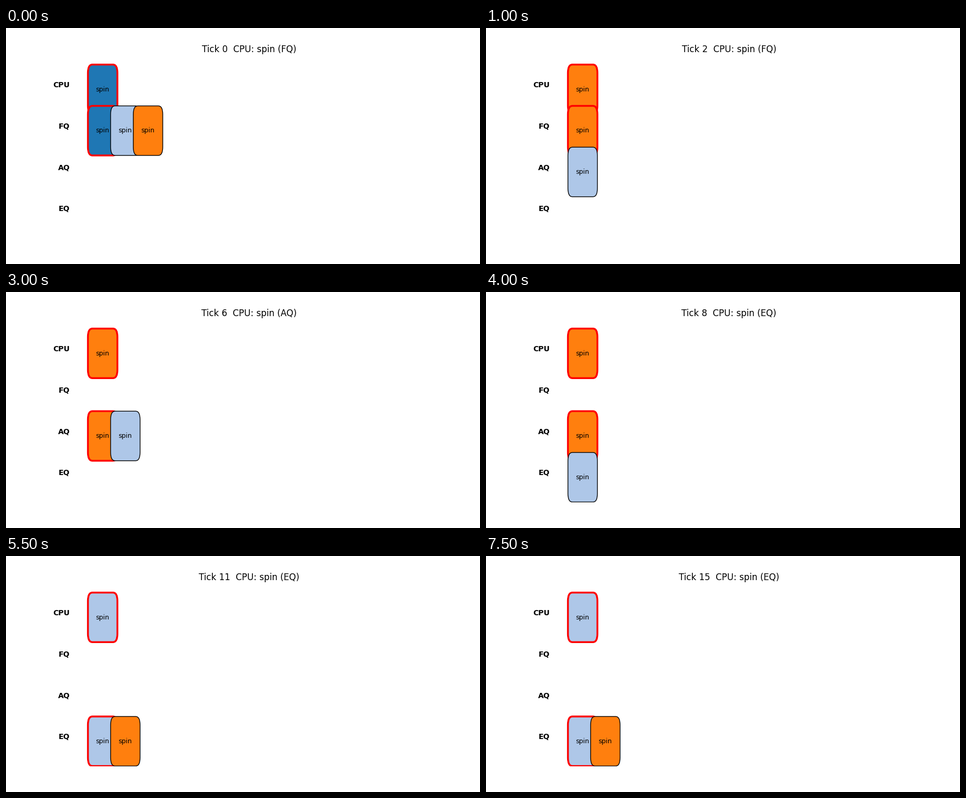
Animation of 900x450 px, one loop 8000 ms. Source, as a matplotlib script:

```python
import matplotlib.pyplot as plt
from matplotlib.animation import FuncAnimation
from matplotlib.patches import FancyBboxPatch

plt.rcParams["font.family"] = "DejaVu Sans"

TICKS = 16
ROWS = {"CPU": 3, "FQ": 2, "AQ": 1, "EQ": 0}
BLUE, LIGHT, ORANGE = "#1f77b4", "#aec7e8", "#ff7f0e"

fig = plt.figure(figsize=(9, 4.5), dpi=100)
ax = fig.add_axes([0.125, 0.11, 0.775, 0.77])


def queues_at(tick):
    """Return the queue contents and the running job's queue."""
    if tick == 0:
        return {"FQ": [BLUE, LIGHT, ORANGE]}, "FQ"
    if tick == 1:
        return {"FQ": [LIGHT, ORANGE]}, "FQ"
    if tick == 2:
        return {"FQ": [ORANGE], "AQ": [LIGHT]}, "FQ"
    if tick == 8:
        return {"AQ": [ORANGE], "EQ": [LIGHT]}, "AQ"
    # Two jobs take turns in a single queue
    pair = [LIGHT, ORANGE] if tick % 2 else [ORANGE, LIGHT]
    name = "AQ" if tick < 8 else "EQ"
    return {name: pair}, name


def title_queue(tick):
    return "FQ" if tick < 3 else "AQ" if tick < 7 else "EQ"


def draw_job(slot, row, color, running):
    ax.add_patch(FancyBboxPatch(
        (slot, row), 0.9, 0.8, boxstyle="round,pad=0.2", facecolor=color,
        edgecolor="red" if running else "black",
        linewidth=2.5 if running else 1))
    ax.text(slot + 0.45, row + 0.4, "spin", ha="center", va="center",
            fontsize=9)


def draw(tick):
    ax.clear()
    ax.set_xlim(-1.2, 15)
    ax.set_ylim(-0.2, 4.2)
    ax.axis("off")
    for name, row in ROWS.items():
        ax.text(-1, row + 0.5, name, ha="right", va="center",
                fontsize=10, weight="bold")

    queues, active = queues_at(tick)
    draw_job(0, ROWS["CPU"], queues[active][0], True)
    for name, jobs in queues.items():
        for slot, color in enumerate(jobs):
            draw_job(slot, ROWS[name], color, name == active and slot == 0)
    ax.set_title(f"Tick {tick}  CPU: spin ({title_queue(tick)})", fontsize=12)
    return []


anim = FuncAnimation(fig, draw, frames=TICKS, init_func=lambda: draw(0),
                     interval=500, repeat=True, repeat_delay=0)
plt.show()
```
